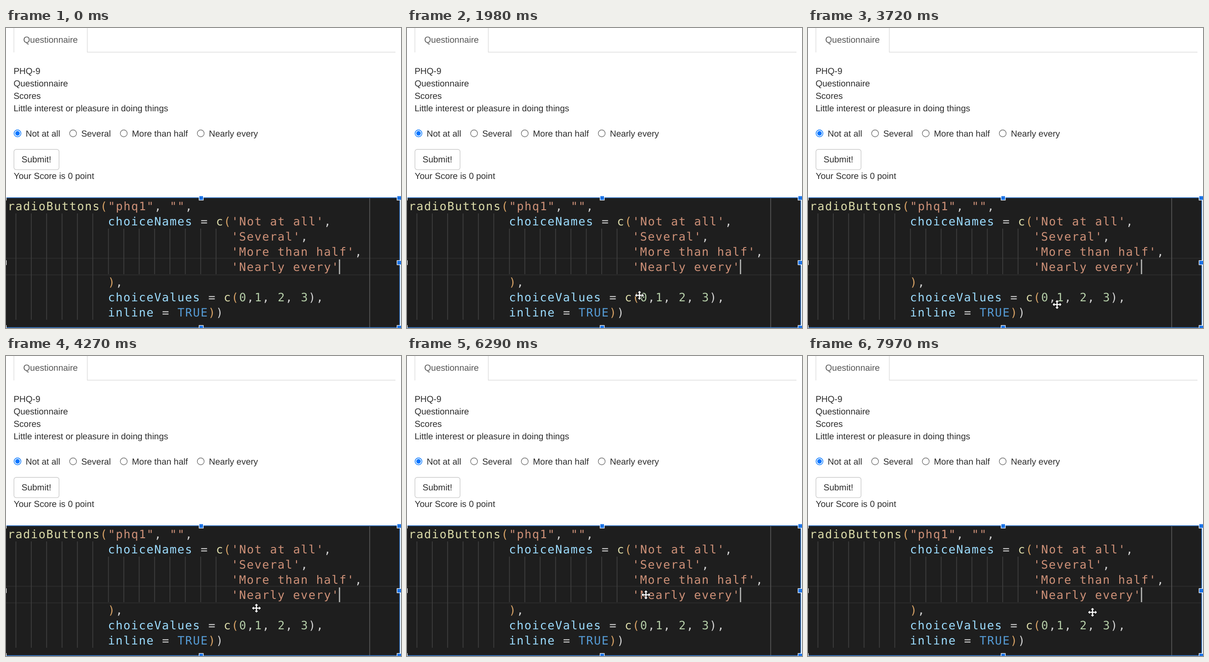
Animation, 858 px wide and 652 px high, one loop 8000 ms. Source, as an HTML page:

```html
<!DOCTYPE html>
<html lang="en">
<head>
<meta charset="utf-8">
<title>Questionnaire</title>
<style>
html, body { margin: 0; width: 100%; height: 100%; overflow: hidden; background: #fff; }
svg { display: block; text-rendering: geometricPrecision; }
.form { font: 19px "Liberation Sans", Arial, sans-serif; fill: #2c2c2c; }
.code { font: 25px "DejaVu Sans Mono", monospace; letter-spacing: 1.7px; white-space: pre; }
.fn { fill: #dcdcaa; }
.str { fill: #ce9178; }
.var { fill: #9cdcfe; }
.num { fill: #b5cea8; }
.key { fill: #569cd6; }
.par { fill: #d7a266; }
.pun { fill: #d4d4d4; }
</style>
</head>
<body>
<svg width="858" height="652" viewBox="0 0 858 652">
  <g fill="none" stroke="#ddd" stroke-width="1.4">
    <path d="M17.2 0V53M176.6 0V52.5H846"/>
    <rect x="17.3" y="263.7" width="98" height="44.2" rx="5" stroke="#ccc"/>
  </g>
  <g class="form" id="form">
    <text x="37.6" y="32" fill="#555">Questionnaire</text>
    <text x="33.8" y="292">Submit!</text>
    <text x="16.8" y="328.4">Your Score is 0 point</text>
  </g>
  <g id="radios" fill="#fff" stroke="#767676" stroke-width="1.4"></g>

  <rect y="368" width="856" height="284" fill="#1e1e1e"/>
  <path d="M0 500.5H854M0 536.5H854" stroke="#2a2a2a" stroke-width="2"/>
  <path id="guides" stroke="#404040" stroke-width="1.6"/>
  <path d="M790 370V652" stroke="#5a5a5a" stroke-width="1.6"/>
  <g class="code" id="code"></g>
  <rect x="723" y="503" width="2.8" height="32" fill="#aeafad"/>
  <path d="M0 368.7H855.3V651.4H0" fill="none" stroke="#3c82d8" stroke-width="1.6"/>
  <g id="handles" fill="#1a73e8" stroke="#fff" stroke-width="1.2"></g>

  <path id="pointer" visibility="hidden" fill="#fff" stroke="#000" stroke-width="1.6" paint-order="stroke"
    d="M0-9.7L4-5.7H1.3V-1.3H5.7V-4L9.7 0 5.7 4V1.3H1.3V5.7H4L0 9.7-4 5.7H-1.3V1.3H-5.7V4L-9.7 0-5.7-4V-1.3H-1.3V-5.7H-4Z"/>
</svg>
<script>
const LOOP = 8000, STEP = 50, CELL = 16.75, ROW = 33.05;
const $ = id => document.getElementById(id);

function add(parent, tag, attrs, text = '') {
  const el = document.createElementNS('http://www.w3.org/2000/svg', tag);
  for (const k in attrs) el.setAttribute(k, attrs[k]);
  el.textContent = text;
  parent.append(el);
  return el;
}

['PHQ-9', 'Questionnaire', 'Scores', 'Little interest or pleasure in doing things'].forEach((text, i) =>
  add($('form'), 'text', { x: 16.4, y: 100 + i * 27.1 }, text));

// Each option follows the measured end of the one before.
const choices = ['Not at all', 'Several', 'More than half', 'Nearly every'];
let left = 25;
choices.forEach((text, i) => {
  add($('radios'), 'circle', { cx: left, cy: 229, r: 7.5, stroke: i ? '#767676' : '#0075ff' });
  const label = add($('form'), 'text', { x: left + 17.7, y: 235.6 }, text);
  left += 45.7 + label.getComputedTextLength();
});
add($('radios'), 'circle', { cx: 25, cy: 229, r: 4.9, fill: '#0075ff', stroke: 'none' });

// Code lines as start column and source, coloured by token.
const lines = [
  [0, 'radioButtons("phq1", "",'],
  [13, `choiceNames = c('${choices[0]}',`],
  [29, `'${choices[1]}',`],
  [29, `'${choices[2]}',`],
  [29, `'${choices[3]}'`],
  [13, '),'],
  [13, 'choiceValues = c(0,1, 2, 3),'],
  [13, 'inline = TRUE))']
];
const token = /(?<str>"[^"]*"|'[^']*')|(?<key>TRUE)|(?<fn>\w+(?=\())|(?<num>\d)|(?<var>\w+)|(?<par>\(|^\)|(?<=E)\))|(?<pun>[^\w"'(]+?)/g;
lines.forEach(([col, source], row) => {
  const line = add($('code'), 'text', { x: 3.85 + col * CELL, y: 396 + row * ROW });
  for (const { 0: text, groups } of source.matchAll(token))
    add(line, 'tspan', { class: Object.keys(groups).find(k => groups[k]) }, text);
});

const bars = (x, n, top, bottom) =>
  Array.from({ length: n }, (_, i) => `M${x + i * 33.4} ${top}V${bottom}`).join('');
$('guides').setAttribute('d', bars(21.5, 6, 403, 634) + bars(222.5, 8, 436, 535));

for (const x of [-4, 424, 854])
  for (const y of [369.5, 510, 651])
    if (x !== 424 || y !== 510) add($('handles'), 'rect', { x: x - 4.6, y: y - 4.6, width: 9.2, height: 9.2 });

// Pointer moves: start, end, then stops spread evenly over that time.
const moves = [
  [440, 970, [506, 426]],
  [1200, 1400, [691, 430]],
  [1680, 2130, [594, 500], [505, 581], [508, 585]],
  [2460, 3240, [505, 457], [657, 452], [645, 456]],
  [3290, 4070, [540, 601], [561, 584]],
  [4120, 4900, [517, 490], [739, 492]],
  [4950, 5710, [586, 609], [597, 580]],
  [5760, 6290, [519, 519]],
  [6290, 6440, [693, 526]],
  [6690, 7480, [641, 600], [661, 595]],
  [7920, 7970, [618, 557]]
];

function pointerAt(t) {
  let at = [634, 564];
  for (const [start, end, ...stops] of moves) {
    if (t < start) break;
    const points = [at, ...stops];
    const k = t >= end ? 1 : Math.floor((t - start) / STEP) * STEP / (end - start);
    const i = Math.min(Math.floor(k * stops.length), stops.length - 1);
    at = points[i].map((v, axis) => Math.round(v + (points[i + 1][axis] - v) * (k * stops.length - i)));
  }
  return at;
}

function draw() {
  const t = performance.now() % LOOP;
  $('pointer').setAttribute('visibility', t < moves[0][0] ? 'hidden' : 'visible');
  $('pointer').setAttribute('transform', `translate(${pointerAt(t)})`);
  requestAnimationFrame(draw);
}
draw();
</script>
</body>
</html>
```
